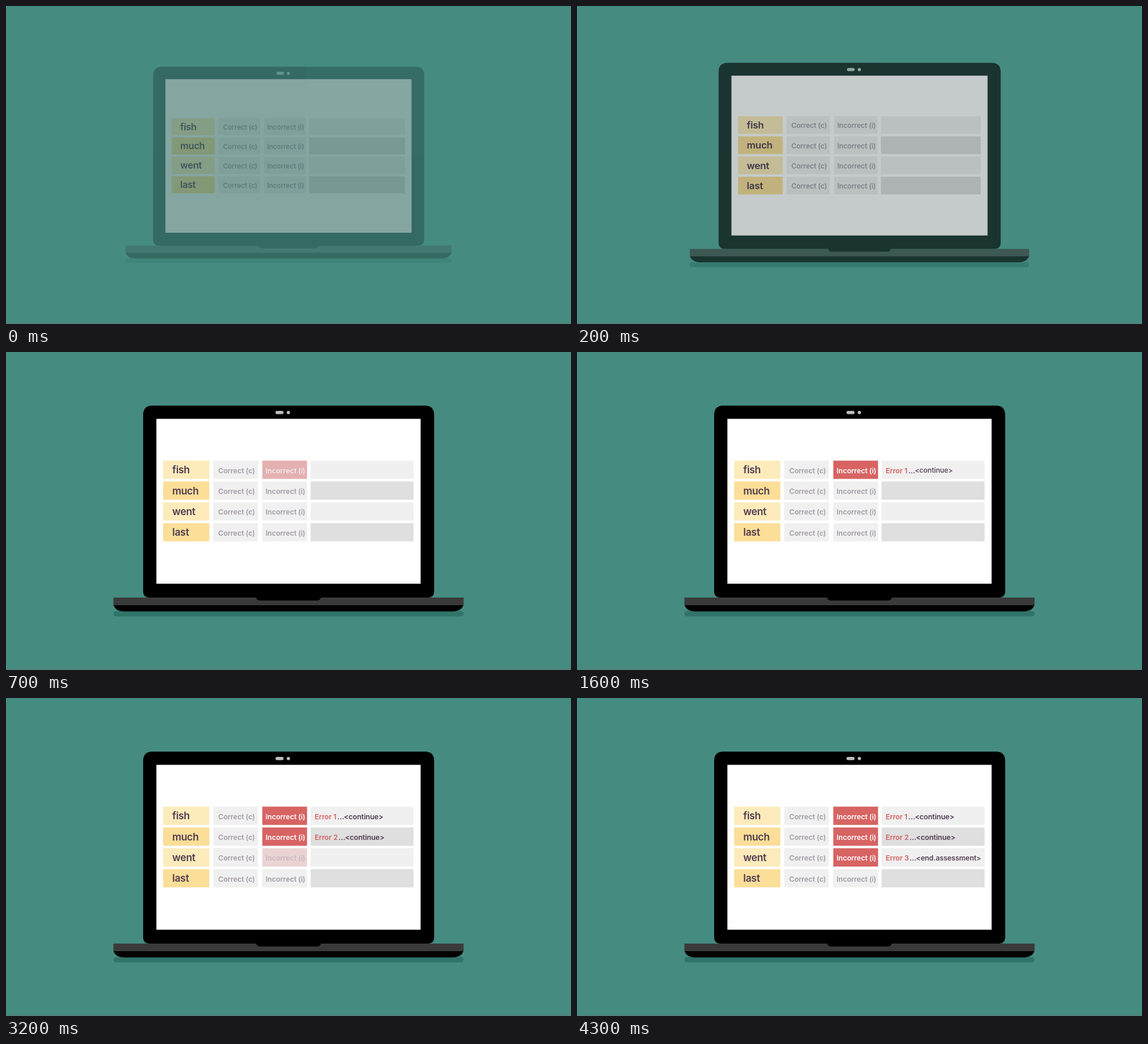
These frames come from a looping animation (960 by 540 pixels, 4.4 s). An HTML page:

```html
<!DOCTYPE html>
<html lang="en">
<head>
<meta charset="utf-8">
<title>Error count</title>
<style>
  html, body { margin: 0; width: 100%; height: 100%; overflow: hidden; background: #458b80; }
  svg { display: block; width: 960px; height: 540px; }
  text { font-family: Inter, "Open Sans", sans-serif; font-weight: 600; font-size: 12.2px; letter-spacing: -.1px; }
  .word { font-size: 17px; font-weight: 600; letter-spacing: -.3px; fill: #4f3b50; }
  .dim { fill: #a29ca6; }
  .red { fill: #d66060; }
  .dark { fill: #4f3b50; }
</style>
</head>
<body>
<svg viewBox="0 0 960 540">
  <rect width="960" height="540" fill="#458b80"/>
  <rect y="538.5" width="960" height="1.5" fill="#56817a"/>
  <g id="laptop">
    <g id="body">
      <rect x="182.5" y="440" width="595" height="9" rx="4.5" fill="#317469"/>
      <path d="M182.5 429H777.5Q774 440.5 759 440.5H201Q186 440.5 182.5 429Z"/>
      <rect x="182.5" y="417" width="595" height="13" fill="#3a3a3a"/>
      <path d="M233 107Q233 91 249 91H711.500Q727.500 91 727.500 107V406Q727.500 417 716.500 417H244Q233 417 233 406Z"/>
      <path d="M425 416.500H535Q534 422 528 422H432Q426 422 425 416.500Z"/>
      <g fill="#bdbdbd">
        <rect x="458" y="100" width="13.500" height="5.500" rx="2.500"/>
        <circle cx="479.800" cy="102.800" r="2.800"/>
      </g>
    </g>
    <g id="screen">
      <rect x="255.500" y="113.500" width="449" height="280" fill="#fff"/>
    </g>
  </g>
</svg>
<script>
const NS = 'http://www.w3.org/2000/svg';
const LOOP = 4400, STEP = 100, FADE = 680;
const $ = id => document.getElementById(id);
const screenEl = $('screen');

function add(parent, tag, attrs, text) {
  const el = document.createElementNS(NS, tag);
  for (const k in attrs) el.setAttribute(k, attrs[k]);
  if (text) el.textContent = text;
  return parent.appendChild(el);
}
const label = (parent, x, y, cls, text) => add(parent, 'text', { x, y, class: cls }, text);
const box = (x, y, width, fill) => add(screenEl, 'rect', { x, y, width, height: 31, fill });

// Start times: red mark, error label, command
const rows = [
  { word: 'fish', at: [497, 870, 1120], cmd: '<continue>', dots: 563, cmdX: 574 },
  { word: 'much', at: [1800, 1850, 2120], cmd: '<continue>', dots: 565, cmdX: 576 },
  { word: 'went', at: [3115, 3471, 3720], cmd: '<end.assessment>', dots: 565, cmdX: 576 },
  { word: 'last' }
];

rows.forEach((r, i) => {
  const y = 184.5 + i * 35.35, base = y + 21, even = i % 2;
  box(267, y, 78.5, even ? '#fbde98' : '#fdebbb');
  box(352, y, 76, '#f0f0f0');
  box(435.5, y, 76, '#f0f0f0');
  box(517.5, y, 175, even ? '#dfdfdf' : '#f0f0f0');
  label(screenEl, 282.5, y + 21.7, 'word', r.word);
  label(screenEl, 360.5, base, 'dim', 'Correct (c)');
  label(screenEl, 441, base, 'dim', 'Incorrect (i)');
  if (!r.at) return;
  r.mark = box(435.5, y, 76, '#d86363');
  r.white = add(screenEl, 'text', { x: 441, y: base, fill: '#fff' }, 'Incorrect (i)');
  r.mid = y + 16.7;
  r.error = add(screenEl, 'g', {});
  label(r.error, 524.5, base, 'red', 'Error ' + (i + 1));
  label(r.error, r.dots, base, 'dark', '…');
  r.command = add(screenEl, 'g', {});
  label(r.command, r.cmdX, base, 'dark', r.cmd);
});

function ease(t, start) {
  const x = Math.min(1, Math.max(0, (t - start) / FADE));
  return 1 - (1 - x) ** 1.7;
}
function zoom(el, p, from, x, y) {
  const s = from + (1 - from) * p;
  el.setAttribute('transform', `translate(${x} ${y}) scale(${s}) translate(${-x} ${-y})`);
}
function grow(el, p, x, y) {
  el.setAttribute('opacity', p);
  zoom(el, p, 0.7, x, y);
}

function draw(t) {
  zoom($('laptop'), ease(t, -148), 0.896, 480, 270);
  $('body').setAttribute('opacity', ease(t, -95));
  screenEl.setAttribute('opacity', ease(t, -175));
  for (const r of rows) {
    if (!r.at) continue;
    const [m, e, c] = r.at.map(start => ease(t, start));
    r.mark.setAttribute('opacity', m);
    r.white.setAttribute('opacity', Math.min(1, m * 2));
    grow(r.error, e, 524.5, r.mid);
    grow(r.command, c, r.cmdX, r.mid);
  }
}

const begin = performance.now();
function tick() {
  const t = (performance.now() - begin) % LOOP;
  draw(Math.floor(t / STEP) * STEP);
  requestAnimationFrame(tick);
}
tick();
</script>
</body>
</html>
```
